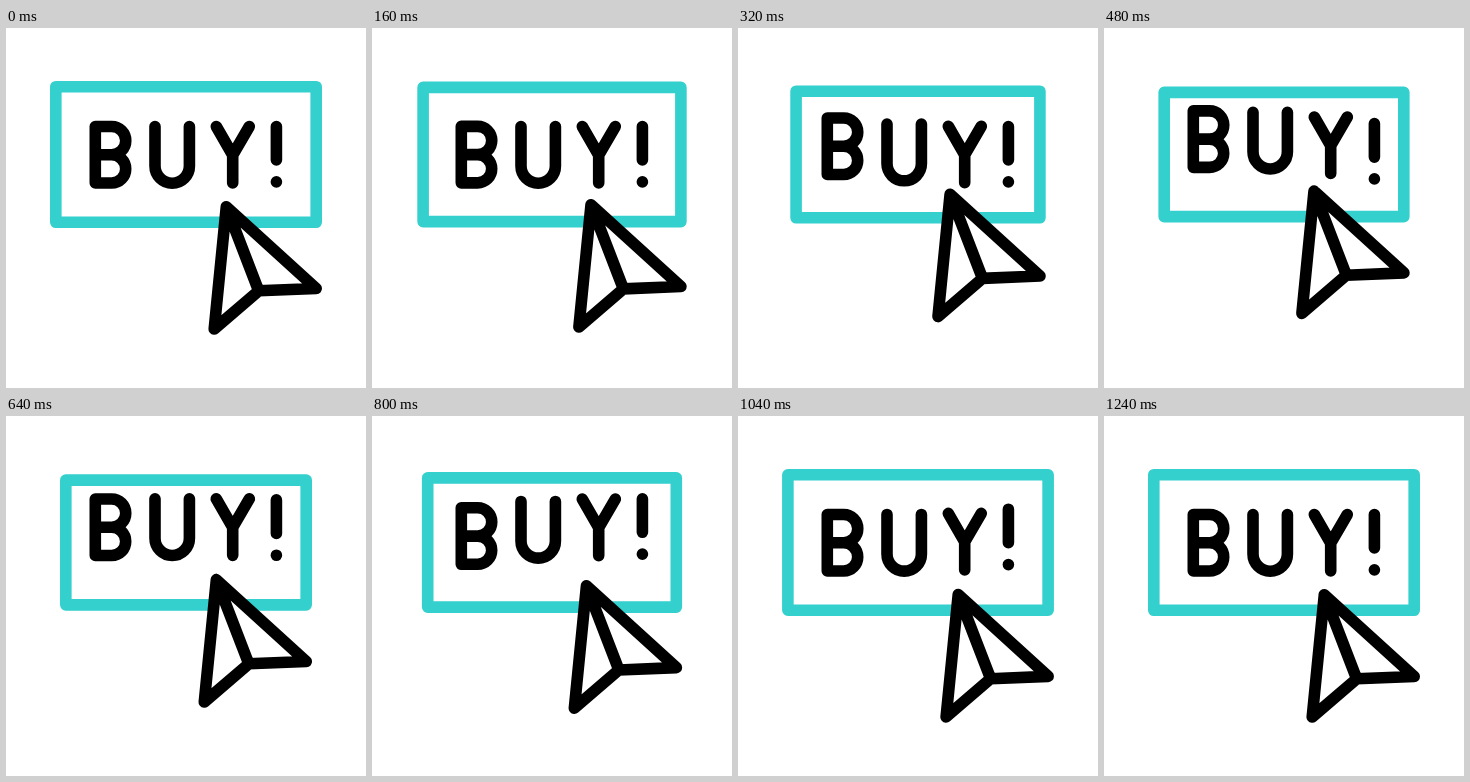
Recreate the animation shown at these times as an HTML page. Size 360x360 px, loop 1.32 s.

```html
<!DOCTYPE html>
<html lang="en">
<head>
<meta charset="utf-8">
<title>Buy button</title>
<style>
  html, body { margin: 0; width: 100%; height: 100%; overflow: hidden; background: #fff; }
  svg { display: block; width: 100%; height: 100%; fill: none; stroke: #000; stroke-width: 11.6;
        stroke-linecap: round; stroke-linejoin: round; }
</style>
</head>
<body>
<svg viewBox="0 0 360 360" role="img" aria-label="BUY!">
  <rect id="box" stroke="#33d0cd"/>
  <g id="word">
    <path d="M89.3 98.5V155H105.6A14.1 14.1 0 0 0 105.6 126.8A14.1 14.1 0 0 0 105.6 98.5ZM89.3 126.8H105.6"/>
    <path d="M149 98.5V138A17.2 17.2 0 0 0 183.4 138V98.5"/>
    <path d="M210.3 98.5L226.7 127L243.3 98.5M226.7 127V155"/>
    <path d="M270.4 98.5V132M270.4 153.8V153.9"/>
  </g>
  <path id="cursor" fill="#fff" d="M220.3 178.7L310.2 260.5L252.7 262.8L208.2 301ZL252.7 262.8"/>
</svg>
<script>
const LOOP = 1320;
const box = document.getElementById('box');
const cursor = document.getElementById('cursor');
const letters = [...document.getElementById('word').children];

// Cubic ease-in-out from 0 to 1, starting at `start` and lasting `length` ms.
function ease(t, start, length) {
  const x = Math.min(1, Math.max(0, (t - start) / length));
  return x < 0.5 ? 4 * x ** 3 : 1 - 4 * (1 - x) ** 3;
}

function draw(t) {
  const press = ease(t, 0, 510) - ease(t, 515, 600);

  const w = 260.4 - 20.8 * press, h = 135.6 - 11.3 * press;
  box.setAttribute('x', 180 - w / 2);
  box.setAttribute('y', 126.5 - h / 2);
  box.setAttribute('width', w);
  box.setAttribute('height', h);

  cursor.setAttribute('transform', `translate(${-10.3 * press} ${-15.6 * press})`);

  letters.forEach((letter, i) => {
    const lift = ease(t, 105 + 75 * i, 420) - ease(t, 580 + 75 * i, 420);
    letter.setAttribute('transform', `translate(0 ${-15.7 * lift})`);
  });
}

const begin = performance.now();
function tick() {
  draw((performance.now() - begin) % LOOP);
  requestAnimationFrame(tick);
}
tick();
</script>
</body>
</html>
```
